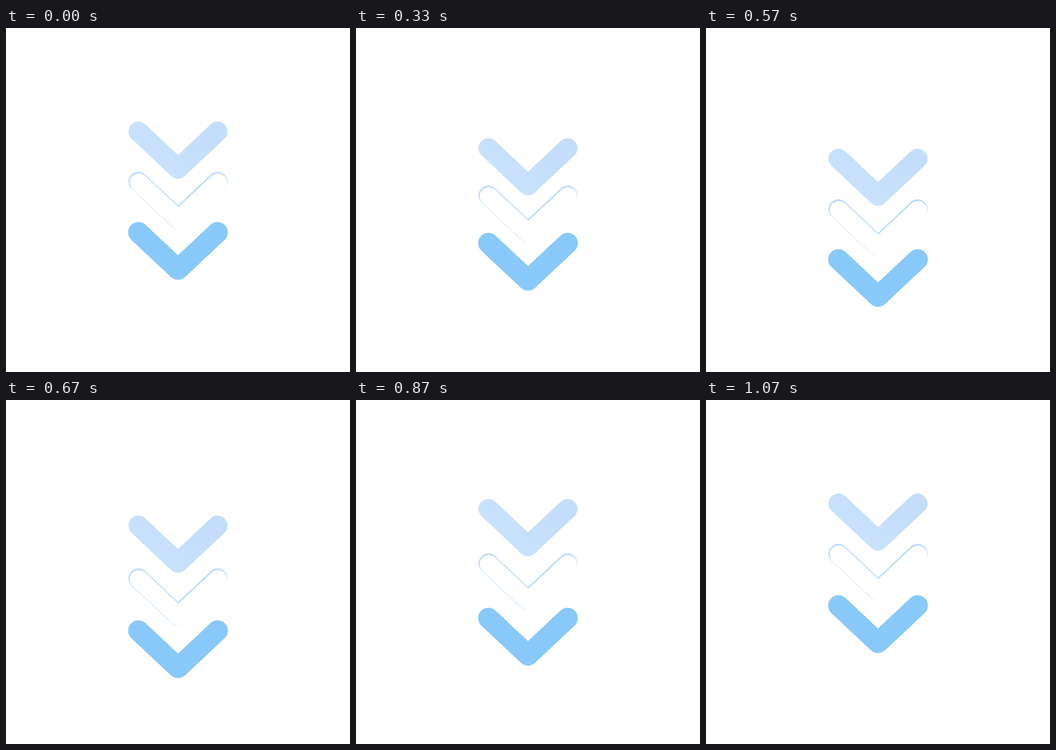
An HTML page for the animation above (1110 ms loop, 500 by 500 pixels).

```html
<!DOCTYPE html>
<html lang="en">
<head>
<meta charset="utf-8">
<title>Scroll down chevrons</title>
<style>
  html, body { margin: 0; width: 100%; height: 100%; overflow: hidden; background: #fff; }
  svg { display: block; width: 100vw; height: 100vh; }
  use { fill: none; stroke-linecap: round; stroke-linejoin: round; }
</style>
</head>
<body>
<svg viewBox="0 0 500 500">
  <defs>
    <path id="chevron" d="M192.5 0L250 54L307.5 0"/>
    <linearGradient id="pale" gradientUnits="userSpaceOnUse" x1="215" y1="60" x2="265" y2="-5">
      <stop offset="0" stop-color="#c9e3fd"/>
      <stop offset="1" stop-color="#c4ddfb"/>
    </linearGradient>
    <linearGradient id="rim" gradientUnits="userSpaceOnUse" x1="0" y1="-14" x2="0" y2="68">
      <stop offset="0" stop-color="#bcdcfc"/>
      <stop offset="1" stop-color="#c4e0fc"/>
    </linearGradient>
  </defs>
  <g class="arrow"><use href="#chevron" stroke="url(#pale)" stroke-width="29"/></g>
  <g class="arrow">
    <use href="#chevron" stroke="url(#rim)" stroke-width="29"/>
    <use href="#chevron" x="0.6" y="1.2" stroke="#fff" stroke-width="26.6"/>
  </g>
  <g class="arrow"><use href="#chevron" stroke="#88c9f9" stroke-width="30"/></g>
</svg>
<script>
const LOOP = 1110;
const TRAVEL = 40;

// Times in ticks of a 30 per second clock.
const moves = [
  { y: 150.5, start: 2, low: 16, end: 30 },
  { y: 223.5, start: 3, low: 17, end: 32 },
  { y: 297, start: 4, low: 18, end: 34 }
];
const arrows = document.querySelectorAll('.arrow');

function ease(from, to, tick) {
  const p = Math.min(1, Math.max(0, (tick - from) / (to - from)));
  return p * p * (3 - 2 * p);
}

// Ticks fall at 0, 30 and 70 ms of each tenth of a second.
function tickAt(ms) {
  const rest = ms % 100;
  return 3 * Math.floor(ms / 100) + (rest >= 30) + (rest >= 70);
}

function draw(now) {
  const tick = tickAt(now % LOOP);
  moves.forEach(({ y, start, low, end }, i) => {
    const drop = TRAVEL * (ease(start, low, tick) - ease(low, end, tick));
    arrows[i].setAttribute('transform', `translate(0 ${y + drop})`);
  });
}

let origin = null;
function loop(now) {
  origin ??= now;
  draw(now - origin);
  requestAnimationFrame(loop);
}

draw(0);
requestAnimationFrame(loop);
</script>
</body>
</html>
```
